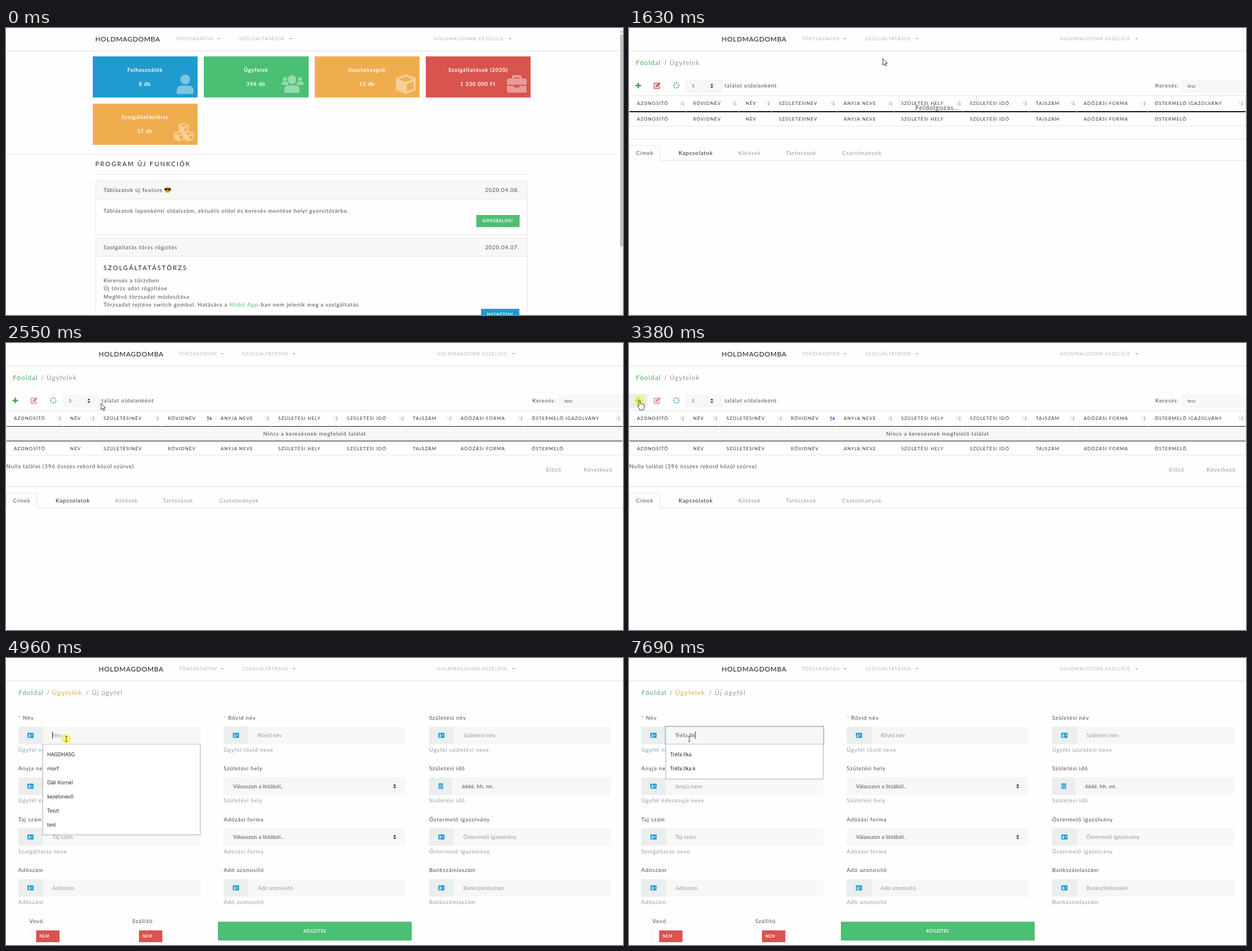
Animation, 1095 px wide and 511 px high, one loop 8 s. Source, as an HTML page:

```html
<!DOCTYPE html>
<html lang="hu">
<head>
<meta charset="utf-8">
<style>
html, body { margin: 0; width: 100%; height: 100%; overflow: hidden; background: #fefefe }
svg { display: block; font-family: Lato, sans-serif }
text { fill: #4a4e51; white-space: pre }
.body { font-size: 9.8px; letter-spacing: .77px }
.brand { font-size: 12px; letter-spacing: .65px; fill: #1a1a1a }
.nav { font-size: 7.8px; letter-spacing: 1.1px; fill: #b4b4b4 }
.tile { font-size: 9.6px; letter-spacing: .68px; font-weight: 700; fill: #fff; text-anchor: middle }
.title { font-size: 11px; letter-spacing: 2.15px; fill: #222 }
.btn { font-size: 6.6px; letter-spacing: .82px; font-weight: 700; fill: #fff; text-anchor: middle }
.submit { font-size: 7.6px; letter-spacing: .5px; font-weight: 700; fill: #fff; text-anchor: middle }
.crumb { font-size: 12px; letter-spacing: .9px }
.busy { font-size: 12px; letter-spacing: .65px }
.th { font-size: 8px; letter-spacing: 1.05px; fill: #333 }
.field { font-size: 9.6px; letter-spacing: .2px }
.small { font-size: 8px }
.item { font: 9px "Open Sans", sans-serif; fill: #111 }
.muted { fill: #919aa1 }
.mid { text-anchor: middle }
.end { text-anchor: end }
</style>
</head>
<body>
<svg id="stage" width="1095" height="511" viewBox="0 0 1095 511"></svg>
<script>
const BLUE = '#1f9bcf', GREEN = '#4bbf73', ORANGE = '#f0ad4e', RED = '#d9534f', GREY = '#919aa1';
const LINE = '#e3e4e5', PALE = '#f7f7f8';

const text = (x, y, cls, str, fill) =>
  `<text x="${x}" y="${y}" class="${cls}"${fill ? ` style="fill:${fill}"` : ''}>${str}</text>`;
const rect = (x, y, w, h, fill, more = '') =>
  `<rect x="${x}" y="${y}" width="${w}" height="${h}" fill="${fill}" ${more}/>`;
const box = (x, y, w, h, fill = 'none') => rect(x, y, w, h, fill, `stroke="${LINE}"`);
const path = (d, fill, more = '') => `<path d="${d}" fill="${fill}" ${more}/>`;
const at = (x, y, inner) => `<g transform="translate(${x} ${y})">${inner}</g>`;
const group = (id, inner) => `<g id="${id}">${inner}</g>`;
const upDown = (x, y) => at(x, y, path('M-2.7-.9 0-4 2.7-.9ZM-2.7 .9 0 4 2.7 .9Z', '#333'));

// Header
const arrowDown = x => path(`M${x} 18h4.6l-2.3 2.4z`, '#a5a5a5');
const header = rect(0, 39.5, 1095, 1, '#e2e2e2') + rect(0, 40.5, 1095, 2, '#f6f6f6') +
  group('menu', text(158.5, 23.5, 'brand', 'HOLDMAGDOMBA') +
    text(301, 22, 'nav', 'TÖRZSADATOK') + arrowDown(375) +
    text(413.5, 22, 'nav', 'SZOLGÁLTATÁSOK') + arrowDown(503) +
    text(759, 22, 'nav', 'HOLDMAGDOMB KEZELŐJE') + arrowDown(892.5));

// Dashboard
const person = (x, y, s) => `<g transform="translate(${x} ${y}) scale(${s})"><circle cx="15" cy="9" r="8.7"/>
  <path d="M0 35V30Q0 20 9 20H21Q30 20 30 30V32Q30 35 27 35Z"/></g>`;
const cube = (x, y, s) => `<path transform="translate(${x} ${y}) scale(${s})" fill-rule="evenodd"
  d="M17.5 0 35 6.5V28L17.5 35 0 28V6.5ZM17.5 4 30 8.7 17.5 13.5 5 8.7ZM19.7 17.5 31 13V25.5L19.7 30Z"/>`;
const icons = {
  user: person(149, 32, 1),
  users: person(138, 37, .4) + person(165, 37, .4) + person(143, 33.5, .9),
  cube: cube(144, 32, 1),
  case: `<path transform="translate(144 33.5)" fill-rule="evenodd" d="M0 17V9Q0 6 3 6H9V3Q9 0 12 0H23Q26 0 26 3V6H32Q35 6 35 9V17ZM13 4V6H22V4ZM0 19H13V22H22V19H35V28Q35 31 32 31H3Q0 31 0 28Z"/>`,
  cubes: cube(152.5, 34, .51) + cube(144, 49, .51) + cube(161.5, 49, .51)
};
const tile = (x, y, fill, name, value, icon) => at(x, y, rect(0, 0, 186, 73.2, fill) +
  `<g fill="#fff" opacity=".42">${icons[icon]}</g>` +
  text(92.8, 27, 'tile', name) + text(92.5, 52.5, 'tile', value));
const news = (y, h, name, date) => box(159.5, y, 766, h) + box(159.5, y, 766, 32, PALE) +
  text(173, y + 19, 'body', name) + text(911, y + 19, 'body end', date);
const button = (x, y, w, fill, str) => rect(x, y, w, 21.5, fill) + text(x + w / 2, y + 12.8, 'btn', str);

const home =
  tile(154, 50.5, BLUE, 'Felhasználók', '8 db', 'user') +
  tile(548, 50.5, ORANGE, 'Inputanyagok', '15 db', 'cube') +
  tile(745, 50.5, RED, 'Szolgáltatások (2020)', '1 330 000 Ft', 'case') +
  tile(154, 134.8, ORANGE, 'Szolgáltatástörzs', '17 db', 'cubes') +
  group('hoverTile', tile(351, 50.5, GREEN, 'Ügyfelek', '396 db', 'users')) +
  rect(0, 224, 1084, 1, LINE) + text(158.5, 246, 'title', 'PROGRAM ÚJ FUNKCIÓK') + rect(159, 260, 767, 1, LINE) +
  news(272.5, 96, 'Táblázatok új feature', '2020.04.08.') +
  '<circle cx="287" cy="288" r="5.8" fill="#f9c23c"/>' +
  path('M281 285.5h12l-.8 3.2q-2.6 2-4.6-.8h-1.2q-2 2.8-4.6 .8z', '#222') +
  path('M284.5 290.8q2.5 1.6 5 0', 'none', 'stroke="#7a4a10"') +
  text(173, 329, 'body', 'Táblázatok laponkénti oldalszám, aktuális oldal és keresés mentése helyi gyorsítótárba.') +
  button(834.5, 333, 77, GREEN, 'KIPRÓBÁLOM!') +
  news(374.5, 150, 'Szolgáltatás törzs rögzítés', '2020.04.07.') +
  text(173, 430.5, 'title', 'SZOLGÁLTATÁSTÖRZS') +
  ['Kerersés a törzsben', 'Új törzs adat rögzítése', 'Meglévő törzsadat módosítása',
   `Törzsadat rejtése switch gombal. Hatására a <tspan fill="${GREEN}">Mobil App</tspan>-ban nem jelenik meg a szolgáltatás`]
    .map((s, i) => text(173, 453 + i * 14.4, 'body', s)).join('') +
  button(843, 500, 68, BLUE, 'MEGNÉZEM!') +
  rect(1089, 0, 6, 511, '#f1f1f1') + rect(1090, 12, 5, 377, '#c1c1c1') + path('M1090.5 8h4l-2-3z', '#999');

// Client list
const NAMES = {
  busy: ['AZONOSÍTÓ', 'RÖVIDNÉV', 'NÉV', 'SZÜLETÉSINÉV'],
  done: ['AZONOSÍTÓ', 'NÉV', 'SZÜLETÉSINÉV', 'RÖVIDNÉV']
};
const STARTS = { busy: [14, 114, 207, 266], done: [14, 114, 173, 287.5] };
const sorter = (x, on) => at(x, 134.5,
  path('M-2.5 4V-3.5M-4-1.5-2.5-3.5-1-1.5', 'none', `stroke="${on ? '#555' : '#dcdcdc'}"`) +
  path(on ? 'M-1 2 2-4 5 2Z' : 'M-.5-1 2-4.5 4.5-1ZM-.5 1 2 4.5 4.5 1ZM1-1h2v2h-2z', on ? '#8078c8' : '#c9c9c9'));
function table(mode) {
  const done = mode === 'done', bottom = done ? 199.5 : 174;
  const names = [...NAMES[mode], 'ANYJA NEVE', 'SZÜLETÉSI HELY', 'SZÜLETÉSI IDŐ', 'TAJSZÁM', 'ADÓZÁSI FORMA', 'ŐSTERMELŐ'];
  const xs = [...STARTS[mode], 381, 483, 605, 722, 807, 933];
  const gaps = xs.slice(1).map(x => rect(x - 13, 148, 1, done ? 1 : 2, '#bbb')).join('');
  return box(.5, 120.5, 1094, bottom - 120.5) + (done ? rect(1, 149, 1093, 25, '#f7f7f5') : '') +
    names.map((s, i) => text(xs[i], 137.4, 'th', i === 9 ? s + ' IGAZOLVÁNY' : s) +
      text(xs[i], bottom - 9, 'th', s) + sorter(i === 9 ? 1086 : xs[i + 1] - 20, done && i === 3)).join('') +
    rect(1, 148, 1093, done ? 1 : 2, '#111') + gaps +
    (done
      ? rect(1, 174, 1093, 1, '#111') + text(548, 164.5, 'body mid', 'Nincs a keresésnek megfelelő találat') +
        text(.5, 222.5, 'body', 'Nulla találat (396 összes rekord közül szűrve)') +
        text(958.5, 228.5, 'body muted', 'Előző') + text(1025, 228.5, 'body muted', 'Következő')
      : rect(479, 121, 1, 27, LINE) + rect(616, 121, 1, 27, LINE) + text(508, 146, 'busy', 'Feldolgozás...')) +
    at(0, done ? 58 : 0, rect(0, 197, 1095, 1.3, LINE) + rect(55, 235.5, 1040, 1, LINE) +
      path('M.5 236V209.5H54.5V236', 'none', `stroke="${LINE}"`) +
      [[12.5, 'Címek', '#55595c'], [88, 'Kapcsolatok', '#222'], [194, 'Kötések', GREY], [278.5, 'Tartozások', GREY],
       [378.5, 'Csatolmányok', GREY]].map(([x, s, c]) => text(x, 226.2, 'body', s, c)).join(''));
}
const dots = Array.from({ length: 8 }, (_, i) => {
  const a = i * Math.PI / 4;
  return `<circle cx="${84 + 4.7 * Math.cos(a)}" cy="${102.3 + 4.7 * Math.sin(a)}" r="1.1" fill="${BLUE}"/>`;
}).join('');
const list = text(12, 66.2, 'crumb', 'Főoldal', '#4fae62') + text(62, 66.2, 'crumb muted', '/') + text(72, 66.2, 'crumb muted', 'Ügyfelek') +
  group('addHover', rect(0, 91, 32.5, 24, '#ececec')) +
  path('M15.2 97.5h2.6v3.6h3.6v2.6h-3.6v3.6h-2.6v-3.6h-3.6v-2.6h3.6z', '#45a845') +
  group('edit', path('M51.5 98.5H44.7V107.5H53.7V103', 'none', `stroke="${RED}" stroke-width="1.5"`) +
    path('M47.5 102.5 53.5 96.5 56 99 50 105 47 105.5Z', RED)) + dots +
  rect(100, 91, 66, 24, PALE) + text(111.5, 105.8, 'small', '5') + upDown(147, 103) +
  text(169.5, 105.8, 'body', 'találat oldalanként') + text(934, 105.8, 'body', 'Keresés:') +
  rect(980, 91, 115, 24, PALE) + text(991, 105.6, 'small', 'tesz') +
  group('busy', table('busy')) + group('done', table('done'));

// New client form: label, hint, kind of input
const FIELDS = [
  ['Név', 'Ügyfél neve'], ['Rövid név', 'Ügyfél rövid neve'], ['Születési név', 'Ügyfél születési neve'],
  ['Anyja neve', 'Ügyfél édesanyja neve'], ['Születési hely', 'Születési hely', 'list'], ['Születési idő', 'Születési idő', 'date'],
  ['Taj szám', 'Szolgáltatás neve'], ['Adózási forma', 'Adózási forma', 'list'], ['Östermelő igazolvány', 'Östermelő igazolvány'],
  ['Adószám', 'Adószám'], ['Adó azonosító', 'Adó azonosító'], ['Bankszámlaszám', 'Bankszámlaszám']
];
const card = path('M0 1Q0 0 1 0H10Q11 0 11 1V8Q11 9 10 9H1Q0 9 0 8Z', BLUE) +
  path('M6.5 3h3v.8h-3zM6.5 5h3v.8h-3zM1.5 7.2q0-1.9 2-1.9t2 1.9z', '#fff') + '<circle cx="3.5" cy="3.6" r="1.3" fill="#fff"/>';
const calendar = rect(.5, 0, 8.5, 10, BLUE, 'rx="1"') +
  path('M.5 2.7h8.5M.5 5.1h8.5M.5 7.5h8.5M3.3 2.7V10M6.2 2.7V10', 'none', 'stroke="#eaeeee" stroke-width=".6"');
function field([label, hint, kind], i, ready) {
  const star = i < 2, date = kind === 'date';
  const addon = !ready ? 33 : date ? 41 : 44;
  const input = kind === 'list'
    ? text(16.5, 34.5, 'field', 'Válasszon a listából..') + upDown(303.5, 31)
    : rect(0, 15.5, addon, 31, '#eaeeee') + (!ready ? '' : date ? at(16, 26, calendar) : at(16.3, 26.5, card)) +
      (date ? text(ready ? 58.5 : 50, 34.5, 'field', 'éééé. hh. nn.')
        : `<g${i || !ready ? '' : ' id="namePlaceholder"'}>${text(addon + 16.5, 34.5, 'field muted', label)}</g>`);
  return at(21.7 + i % 3 * 364.6, 106.8 + Math.floor(i / 3) * 90.5,
    (star ? text(0, 3.5, 'body', '*', i ? ORANGE : RED) : '') + text(star ? 8 : 0, 3, 'body', label) +
    rect(0, 15.5, 323, 31, PALE) + input + text(0, 60, 'body muted', hint));
}
const toggle = (x, label, ready) => text(x, 471.8, 'body', label) + (ready
  ? rect(x, 485.5, 12, 20.5, '#fff', 'stroke="#eee"') + rect(x + 12, 485, 41.5, 21, RED) + text(x + 27, 498, 'btn', 'NEM')
  : rect(x - 4, 481.5, 15.5, 15.5, '#e2e2e2', 'stroke="#858585" rx="2.5"'));
const form = ready => FIELDS.map((f, i) => field(f, i, ready)).join('') +
  toggle(41.5, 'Vevő', ready) + toggle(224, 'Szállító', ready) +
  rect(376, 469.5, 344, 33.5, GREEN) + text(548, 489, 'submit', 'RÖGZÍTÉS');
const crumbs = text(22, 66.2, 'crumb', 'Főoldal', '#55b088') + text(72, 66.2, 'crumb muted', '/') +
  text(81.5, 66.2, 'crumb', 'Ügyfelek', '#e5ae50') + text(141.5, 66.2, 'crumb muted', '/') + text(152, 66.2, 'crumb muted', 'Új ügyfél');

const popup = rect(64, 153.5, 282, 30, '#000', 'id="popShade" opacity=".12" rx="1"') +
  rect(65.5, 153.5, 279, 30, '#fff', 'id="popBox" stroke="#c4c6c8"') +
  Array.from({ length: 6 }, (_, i) => text(73, 175.3 + i * 24.85, 'item', '')).join('');
const pointers = group('arrow', path('M0 0V11.8L2.7 9.4 4.4 13.2 6.2 12.4 4.5 8.7H8.2Z', '#fff', 'stroke="#222" stroke-width=".9"')) +
  group('hand', path('M-1.2 8.5V1Q-1.2-.2 0-.2T1.2 1V5.2Q3 4 3.5 5.7 5.5 4.5 5.8 6.4 8 5.7 8 7.8V11Q8 13 6.8 14.2V16H-.5V14.5L-3.7 9.7Q-4.2 8.2-3 8Z', '#fff', 'stroke="#222" stroke-width=".9" stroke-linejoin="round"')) +
  group('beam', path('M-2-4.8H-.6L0-4 .6-4.8H2M0-4V4M-2 4.8H-.6L0 4 .6 4.8H2', 'none', 'stroke="#333" stroke-width=".9"'));

const stage = document.getElementById('stage');
const $ = id => document.getElementById(id);
stage.innerHTML = header + group('home', home) + group('list', list) +
  group('formPage', crumbs + group('raw', form(false)) + group('ready', form(true)) +
    rect(64.5, 121.8, 281, 32, 'none', 'id="focus" stroke="#b9bcbf" stroke-width="2"') +
    group('typed', text(82, 141.3, 'field', '', '#55595c')) +
    rect(82, 131, .9, 13, '#222', 'id="caret"') + group('popup', popup)) +
  '<circle id="click" r="8.5" fill="#fbf52a" opacity=".65"/>' + group('pointer', pointers);

const PATH = [
  [210, 979, 465], [340, 699, 200], [520, 699, 200], [630, 540, 123], [770, 482, 93], [900, 451, 54],
  [1630, 451, 54], [1850, 338, 104], [2220, 208, 108], [2420, 208, 108], [3050, 19, 103],
  [3700, 19, 103], [3810, 22, 104], [4230, 22, 104], [4680, 107, 144], [8000, 107, 144]
];
const CLICKS = [[1130, 1280], [3380, 3580], [4830, 5030]];
const NAME = 'Tréfa Ilka', KEYS = [5960, 6340, 6540, 6740, 6890, 7040, 7430, 7610, 7690];
const HISTORY = [
  [0, ['HAGDHASG', 'morf', 'Dáli Kornél', 'kezelonev0', 'Teszt', 'test']],
  [5960, ['Tréfa', 'test', NAME, NAME + ' k', 'Teszt', 'tréfa']],
  [6740, [NAME, NAME + ' k', 'Tréfa', 'tréfa', 'tréfa2', 'tréfás']],
  [7055, [NAME, NAME + ' k']]
];
const items = [...document.querySelectorAll('.item')];
const typedText = $('typed').firstChild;
const show = (id, on) => { $(id).style.display = on ? '' : 'none'; };
const ramp = (t, a, b) => Math.min(1, Math.max(0, (t - a) / (b - a)));

function pointerAt(t) {
  const i = Math.max(1, PATH.findIndex(p => p[0] > t));
  const [a, x, y] = PATH[i - 1], [b, u, v] = PATH[i], k = ramp(t, a, b);
  return [x + (u - x) * k, y + (v - y) * k];
}

function draw(t) {
  const [x, y] = pointerAt(t);
  const onHome = t < 1630, onList = !onHome && t < 3810, onForm = t >= 3810;
  show('home', onHome); show('list', onList); show('formPage', onForm);
  $('menu').setAttribute('transform', `translate(${onHome ? 0 : 6} 0)`);

  const grow = 1 + .05 * ramp(t, 630, 750);
  $('hoverTile').setAttribute('transform', `translate(444 87.1) scale(${grow}) translate(-444 -87.1)`);

  const loaded = t >= 2050, overAdd = onList && x < 32;
  show('busy', !loaded); show('done', loaded); show('addHover', overAdd);
  $('edit').setAttribute('opacity', loaded ? .68 : 1);

  show('raw', t >= 4230 && t < 4300); show('ready', t >= 4300);
  const typed = NAME.slice(0, KEYS.filter(k => k <= t).length);
  typedText.textContent = typed;
  show('namePlaceholder', !typed);
  $('focus').setAttribute('opacity', ramp(t, 4970, 5070));
  $('caret').setAttribute('x', 82 + (typed ? typedText.getComputedTextLength() : 0));
  show('caret', t >= 4880 && !(t >= 5440 && t < 5960));

  const choices = HISTORY.filter(h => h[0] <= t).pop()[1];
  items.forEach((el, i) => { el.textContent = choices[i] || ''; });
  const height = choices.length * 24.85 + 12;
  $('popBox').setAttribute('height', height);
  $('popShade').setAttribute('height', height + 1.5);
  $('popup').setAttribute('opacity', ramp(t, 4870, 4940));

  const inInput = onForm && x > 66 && y > 122;
  const inTile = onHome && t < 1280 && x < 541 && y < 125;
  const hand = inTile || overAdd;
  show('pointer', t >= 210);
  show('hand', hand); show('beam', inInput); show('arrow', !hand && !inInput);
  $('pointer').setAttribute('transform', `translate(${x} ${y})`);
  $('click').setAttribute('transform', `translate(${x} ${y})`);
  show('click', CLICKS.some(([a, b]) => t >= a && t < b));
}

function tick() {
  draw(performance.now() % 8000);
  requestAnimationFrame(tick);
}
tick();
</script>
</body>
</html>
```
